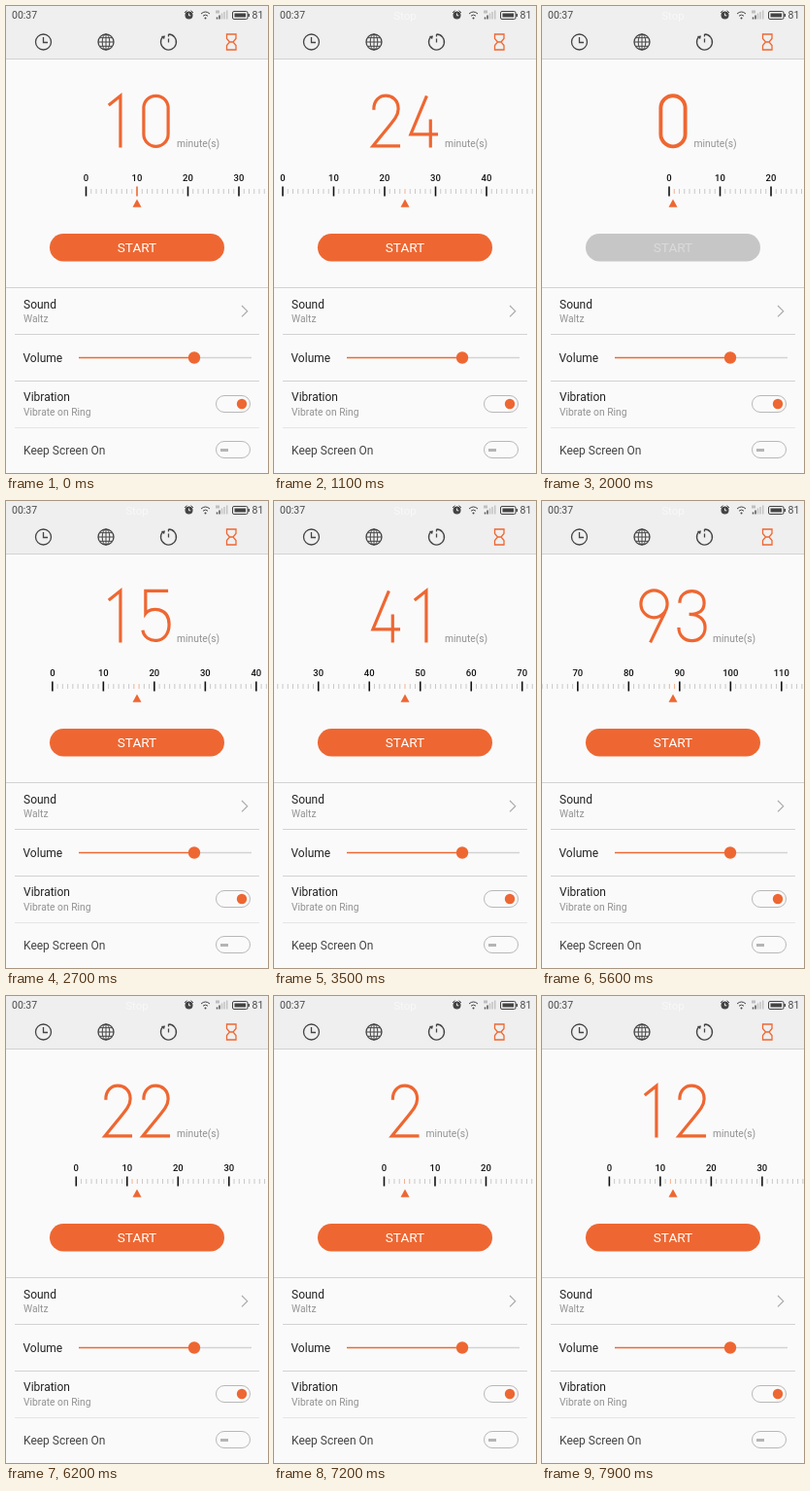
An HTML page that plays this animation: 270 by 480 pixels, repeating every 8000 ms.

```html
<!DOCTYPE html>
<html lang="en">
<head>
<meta charset="utf-8">
<title>Timer</title>
<style>
  html, body { margin: 0; width: 100%; height: 100%; overflow: hidden; background: #fafafa; }
  svg { display: block; width: 100%; height: 100%; font-family: Roboto, sans-serif; }
  .line { fill: none; stroke: #444; stroke-width: 1.3; }
  .rule { stroke: #d2d2d2; stroke-width: 1; }
  .accent { fill: #ee6732; }
  .accent-line { fill: none; stroke: #ee6732; }
  .title { font-size: 12px; fill: #222; }
  .sub { font-size: 10.3px; fill: #929292; }
  .status { font-size: 10.5px; fill: #4a4a4a; }
  .switch { fill: #fafafa; stroke: #b8b8b8; stroke-width: 1; }
  #scale text { font-size: 9.5px; font-weight: 500; fill: #111; text-anchor: middle; }
</style>
</head>
<body>
<svg viewBox="0 0 270 480">
  <rect width="270" height="480" fill="#fafafa"/>
  <rect width="270" height="54" fill="#efefef"/>
  <path class="rule" d="M0 54.5H270"/>

  <!-- Status bar -->
  <text class="status" x="6" y="13">00:37</text>
  <text id="ghost" x="135" y="13.5" font-size="11.5" fill="#f8f8f8" text-anchor="middle">Stop</text>
  <circle cx="188.5" cy="9.5" r="4" fill="#444"/>
  <path d="M188.5 7.5v2.3h1.8" fill="none" stroke="#efefef"/>
  <g class="line" style="stroke-width:1">
    <path d="M184 7l2.4-2.4M193 7l-2.4-2.4"/>
    <path d="M201 8q4.5-4 9 0M203 10.2q2.5-2.200 5 0"/>
    <rect x="233.5" y="5.500" width="15.500" height="8" rx="1.5"/>
  </g>
  <circle cx="205.5" cy="12.5" r="1" fill="#444"/>
  <path d="M217.5 13.5v-2M220 13.5v-4" stroke="#555" stroke-width="1.5"/>
  <path d="M222.5 13.5v-6M225 13.5v-7.5M227.7 13.5V4.5" stroke="#c4c4c4" stroke-width="1.5"/>
  <path d="M217 4.5v3M219 4.5v3" stroke="#777" stroke-width=".8"/>
  <path d="M235.5 7.5h11.500v4h-11.500zM249.500 8h1.500v3h-1.500z" fill="#444"/>
  <text class="status" x="253.5" y="13">81</text>

  <!-- Tabs -->
  <g class="line">
    <circle cx="38.5" cy="37" r="8"/>
    <path d="M38.5 32v5.500H43"/>
    <circle cx="103" cy="37" r="8"/>
    <g style="stroke-width:1">
      <ellipse cx="103" cy="37" rx="3.8" ry="8"/>
      <path d="M95 37h16M103 29v16M96.5 32.7h13M96.5 41.3h13"/>
    </g>
    <path d="M167.5 29a8 8 0 1 1-6 2.700M167.5 29v2.500M167.5 33.500v4"/>
  </g>
  <path d="M160 31l4-.5-1 3.800z" fill="#444"/>
  <path class="accent-line" stroke-width="1.3" d="M227.500 29H237v4.500L234 37l3 3.500V45H227.500V40.500L230.500 37l-3-3.500zM230.500 37h3.500"/>

  <!-- Picker -->
  <g id="digits" class="accent-line"></g>
  <text id="unit" class="sub" y="145">minute(s)</text>
  <g id="scale"></g>
  <path class="accent" d="M135 198.500l4.500 8.200h-9z"/>
  <rect id="button" x="45" y="234" width="180" height="28.500" rx="14.250"/>
  <text id="start" x="135" y="253.300" font-size="13.600" text-anchor="middle">START</text>

  <!-- Settings -->
  <path class="rule" d="M0 289.500H270M9 337.500H261M9 385.500H261"/>
  <path class="rule" d="M9 433.500H261" opacity=".5"/>
  <text class="title" x="18" y="311">Sound</text>
  <text class="sub" x="18" y="325">Waltz</text>
  <path class="line" d="M243 308l5.700 5.700-5.700 5.700" style="stroke:#aaa;stroke-width:1.2"/>
  <text class="title" x="17.500" y="365.500">Volume</text>
  <path d="M194 361.500H253" stroke="#d2d2d2" stroke-width="1.300"/>
  <path class="accent-line" d="M75 361.500H194" stroke-width="1.600"/>
  <circle class="accent" cx="194" cy="361.500" r="6.200"/>
  <text class="title" x="18" y="406">Vibration</text>
  <text class="sub" x="18" y="420.500">Vibrate on Ring</text>
  <rect class="switch" x="216.500" y="400.500" width="35" height="17" rx="8.500"/>
  <circle class="accent" cx="243" cy="409" r="5.200"/>
  <text class="title" x="18" y="460.500" style="fill:#444">Keep Screen On</text>
  <rect class="switch" x="216.500" y="447.500" width="35" height="17" rx="8.500"/>
  <path d="M221 456.500h8" stroke="#b4b4b4" stroke-width="3"/>
</svg>
<script>
const LOOP = 8000, STEP = 100, WIDTH = 270, CENTER = WIDTH / 2, MINUTE = 5.25;
const ACCENT = '#ee6732';
const $ = id => document.getElementById(id);

// Stroke shapes, centred on x = 0
const GLYPHS = [
  'M-13 13a13 13 0 0 1 26 0v28a13 13 0 0 1-26 0z',
  'M-10 10L2.500 0V55',
  'M-13 15C-14-5 13-5 13 14C13 22 8 26-14 53.500H15',
  'M-13 13C-13-4 13-4 13 13C13 21 8 25-3 25C8 25 14 31 14 39C14 58-14 58-14 39',
  'M3 0L-14 41H15M7 25V55',
  'M13 0H-11V24C-6 17 14 17 14 36C14 58-12 57-14 42',
  'M4-1L-12 31M-14 39a14 14.500 0 1 1 28 0a14 14.500 0 1 1-28 0',
  'M-12 9V0H14L-6 55',
  'M-11.500 12a11.500 12 0 1 1 23 0a11.500 12 0 1 1-23 0M-14 39a14 14.500 0 1 1 28 0a14 14.500 0 1 1-28 0',
  'M-4 55L12 22M14 14a14 14.500 0 1 1-28 0a14 14.500 0 1 1 28 0'
];

// Dial position in minutes: [ms, value]
const KEYS = [
  [0, 10], [300, 15], [700, 22], [1100, 24], [1200, 24], [1500, 14], [1900, 0],
  [2000, .76], [2300, 8], [2600, 15], [2700, 16.6], [3000, 19.5], [3500, 47],
  [4000, 72], [4100, 72], [4300, 76], [4400, 78.3], [4700, 87], [5000, 93],
  [5500, 93], [5600, 88.7], [5900, 45], [6400, 2], [7100, 2], [7200, 4.1],
  [7500, 9], [7800, 12], [7900, 12.5]
];

const rate = i => KEYS[i + 1]
  ? (KEYS[i + 1][1] - KEYS[i][1]) / (KEYS[i + 1][0] - KEYS[i][0]) : 0;

// Harmonic mean of neighbouring rates keeps the curve monotone between keys
function slope(i) {
  if (i === 0) return rate(0);
  const a = rate(i - 1), b = rate(i);
  return a * b > 0 ? 2 * a * b / (a + b) : 0;
}

function position(t) {
  const i = KEYS.findLastIndex(key => key[0] <= t);
  if (i === KEYS.length - 1) return KEYS[i][1];
  const [t0, a] = KEYS[i], [t1, b] = KEYS[i + 1];
  const span = t1 - t0, u = (t - t0) / span, v = 1 - u;
  return a * v * v * (1 + 2 * u) + b * u * u * (3 - 2 * u)
    + span * u * v * (slope(i) * v - slope(i + 1) * u);
}

function drawDigits(value) {
  const chars = [...String(value)];
  $('digits').innerHTML = chars.map((c, i) => {
    const x = CENTER + (i - (chars.length - 1) / 2) * 39;
    return `<path transform="translate(${x} 92.300) scale(.97 .965)" d="${GLYPHS[c]}"/>`;
  }).join('');
  $('digits').setAttribute('stroke-width', value ? 3.3 : 4);
  $('unit').setAttribute('x', CENTER + 2 + chars.length * 19.5);
}

function drawScale(pos) {
  const reach = CENTER / MINUTE;
  let out = '';
  for (let m = Math.max(0, Math.ceil(pos - reach)); m < pos + reach; m++) {
    const offset = (m - pos) * MINUTE, x = CENTER + offset, major = m % 10 === 0;
    const near = Math.abs(offset) < (major ? 2.6 : 5);
    const color = near ? (major ? ACCENT : '#f5b08f') : major ? '#111' : '#c9c9c9';
    const span = major ? '185.500V195.500' : '188V193';
    out += `<path d="M${x} ${span}" stroke="${color}" stroke-width="${major ? 1.6 : 1}"/>`;
    if (major) out += `<text x="${x}" y="180">${m}</text>`;
  }
  $('scale').innerHTML = out;
}

function render(time) {
  const t = Math.floor(time % LOOP / STEP) * STEP;
  const value = Math.round(position(Math.max(0, t - STEP)));
  drawDigits(value);
  drawScale(position(t));
  $('button').setAttribute('fill', value ? ACCENT : '#c6c6c6');
  $('start').setAttribute('fill', value ? '#fff' : '#dadada');
  $('ghost').style.opacity = t ? 1 : 0;
}

const begin = performance.now();
function tick() {
  render(performance.now() - begin);
  requestAnimationFrame(tick);
}
tick();
</script>
</body>
</html>
```
